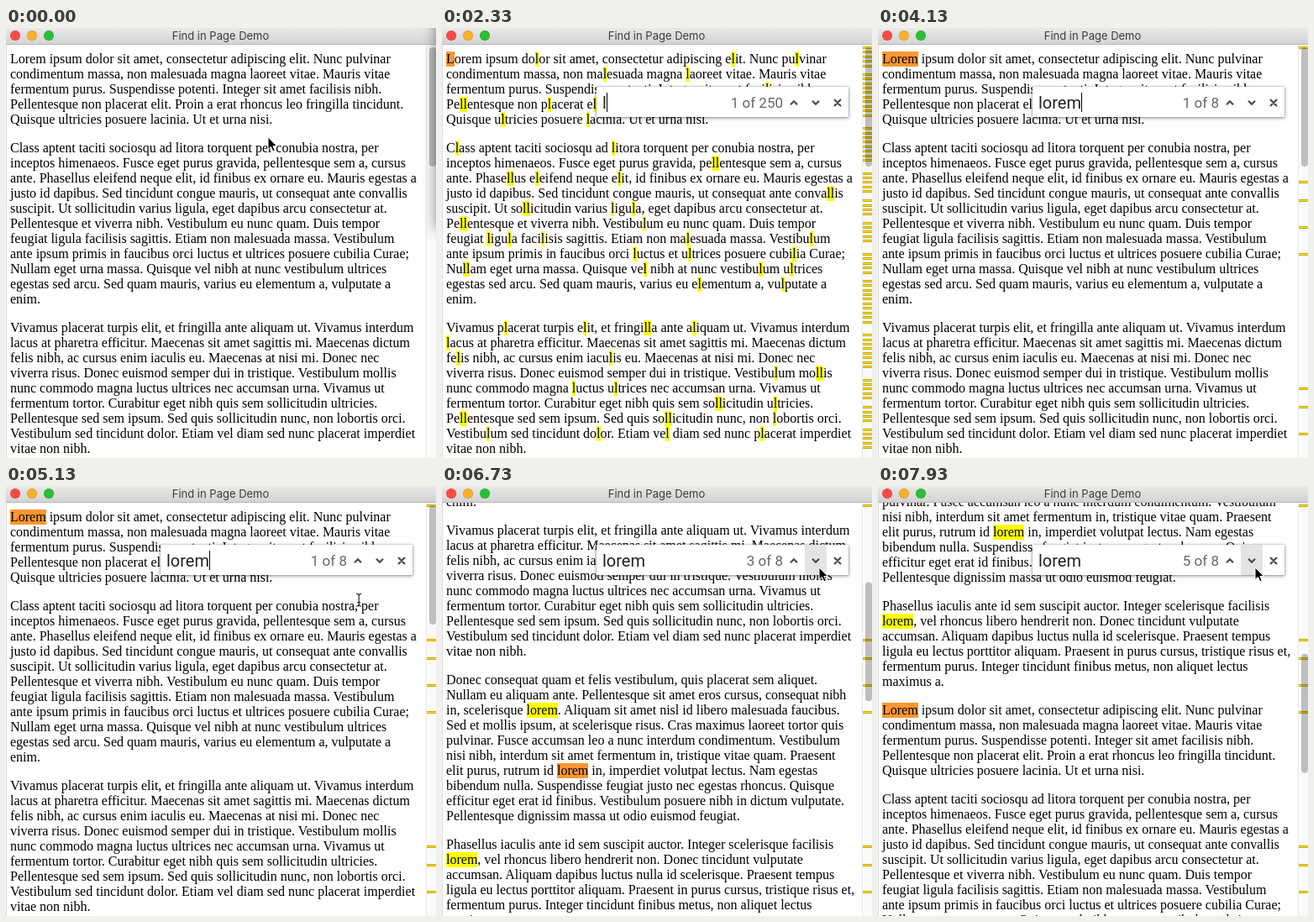
An HTML page for the animation above (8 s loop, 512 by 512 pixels).

```html
<!DOCTYPE html>
<html lang="en">
<head>
<meta charset="utf-8">
<title>Find in Page Demo</title>
<style>
  html, body { margin: 0; width: 100%; height: 100%; overflow: hidden; background: #fff; }
  #stage { position: relative; width: 512px; height: 512px; overflow: hidden; background: #fefefe; }
  #stage div, #stage svg { position: absolute; }
  #title { inset: 0 0 auto; height: 19px; border-bottom: 1px solid #b9b9b9;
    background: linear-gradient(#e9e9e9, #d3d3d3); color: #3c3c3c; text-align: center;
    font: 13px/19px Inter, sans-serif; text-indent: -1px; }
  #title i { position: absolute; top: 3px; width: 12px; height: 12px; border-radius: 50%; box-shadow: inset 0 0 0 .5px #0003; }
  #view { top: 20px; left: 0; width: 500px; height: 492px; overflow: hidden; }
  #doc { top: 0; left: 0; width: 500px; }
  #text { top: 8px; left: 5px; font: 16px/18px "Liberation Serif", Times, serif; color: #000; white-space: pre; }
  #text p { margin: 0 0 16px; }
  #text span { display: block; }
  .hit { height: 18px; background: #ff0; }
  .hit.on { background: #ff9632; }
  #track { top: 20px; left: 500px; width: 11px; height: 492px; background: #fafafa; border-left: 1px solid #e8e8e8; }
  .tick { left: 0; width: 11px; height: 1px; background: #ffe11a; border: solid #c9a800; border-width: 1px 0; }
  #thumb { top: 3px; left: 3px; width: 8px; height: 142px; border-radius: 4px; background: #0000003d; }
  #edge { left: 0; top: 20px; width: 1px; height: 492px; background: #dedede; }
  #shade { left: 514px; top: -20px; width: 40px; height: 254px; box-shadow: 0 4px 16px 2px #0007; }
  #bar { left: 184px; top: 70px; width: 300px; height: 36px; background: #fff;
    box-shadow: 0 0 1px #0006, 0 1px 4px #0007; font-family: Roboto, sans-serif; }
  #query { left: 7px; top: 7px; font-size: 20px; line-height: 24px; color: #222; white-space: pre; }
  #caret { right: -1px; top: 0; width: 1px; height: 23px; background: #000; }
  #count { right: 78px; top: 7px; font-size: 17px; line-height: 24px; color: #666; white-space: pre; }
  #hover { left: 248px; top: 0; width: 26px; height: 36px; background: #e4e4e4; }
  #bar svg { left: 0; top: 0; fill: none; stroke: #4a4a4a; stroke-width: 2.2; }
  .mouse { left: 0; top: 0; overflow: visible; }
</style>
</head>
<body>
<div id="stage">
  <div id="view"><div id="doc"><div id="marks"></div><div id="text"></div></div></div>
  <div id="track"><div id="ticks"></div><div id="thumb"></div></div>
  <div id="edge"></div>
  <div id="title"><i style="left:5px;background:#fc4a46"></i><i style="left:25px;background:#fdb02b"></i><i style="left:45px;background:#29c032"></i>Find in Page Demo</div>
  <div id="bar">
    <div id="hover"></div>
    <div id="query"><span id="typed"></span><div id="caret"></div></div>
    <div id="count"></div>
    <svg width="300" height="36"><path d="M231 21.2l4-4 4 4M257 16.8l4 4 4-4M283 15l8 8m0-8l-8 8"/></svg>
  </div>
  <div id="shade"></div>
  <svg id="arrow" class="mouse" width="12" height="18"><path d="M0 0V14.5L3.4 11.4 5.8 16.8 8.2 15.8 5.9 10.5H10.4Z" fill="#000" stroke="#fff" stroke-width="1" stroke-linejoin="round"/></svg>
  <svg id="beam" class="mouse" width="8" height="17"><g fill="none"><path d="M-3-7.5Q0-7.5 0-5V5Q0 7.5-3 7.5M3-7.5Q0-7.5 0-5M0 5Q0 7.5 3 7.5M-2 3H2" stroke="#fff" stroke-width="2.4"/><path d="M-3-7.5Q0-7.5 0-5V5Q0 7.5-3 7.5M3-7.5Q0-7.5 0-5M0 5Q0 7.5 3 7.5M-2 3H2" stroke="#111" stroke-width="1.1"/></g></svg>
</div>
<script>
const COPY = `Lorem ipsum dolor sit amet, consectetur adipiscing elit. Nunc pulvinar
condimentum massa, non malesuada magna laoreet vitae. Mauris vitae
fermentum purus. Suspendisse potenti. Integer sit amet facilisis nibh.
Pellentesque non placerat elit. Proin a erat rhoncus leo fringilla tincidunt.
Quisque ultricies posuere lacinia. Ut et urna nisi.

Class aptent taciti sociosqu ad litora torquent per conubia nostra, per
inceptos himenaeos. Fusce eget purus gravida, pellentesque sem a, cursus
ante. Phasellus eleifend neque elit, id finibus ex ornare eu. Mauris egestas a
justo id dapibus. Sed tincidunt congue mauris, ut consequat ante convallis
suscipit. Ut sollicitudin varius ligula, eget dapibus arcu consectetur at.
Pellentesque et viverra nibh. Vestibulum eu nunc quam. Duis tempor
feugiat ligula facilisis sagittis. Etiam non malesuada massa. Vestibulum
ante ipsum primis in faucibus orci luctus et ultrices posuere cubilia Curae;
Nullam eget urna massa. Quisque vel nibh at nunc vestibulum ultrices
egestas sed arcu. Sed quam mauris, varius eu elementum a, vulputate a
enim.

Vivamus placerat turpis elit, et fringilla ante aliquam ut. Vivamus interdum
lacus at pharetra efficitur. Maecenas sit amet sagittis mi. Maecenas dictum
felis nibh, ac cursus enim iaculis eu. Maecenas at nisi mi. Donec nec
viverra risus. Donec euismod semper dui in tristique. Vestibulum mollis
nunc commodo magna luctus ultrices nec accumsan urna. Vivamus ut
fermentum tortor. Curabitur eget nibh quis sem sollicitudin ultricies.
Pellentesque sed sem ipsum. Sed quis sollicitudin nunc, non lobortis orci.
Vestibulum sed tincidunt dolor. Etiam vel diam sed nunc placerat imperdiet
vitae non nibh.

Donec consequat quam et felis vestibulum, quis placerat sem aliquet.
Nullam eu aliquam ante. Pellentesque sit amet eros cursus, consequat nibh
in, scelerisque lorem. Aliquam sit amet nisl id libero malesuada faucibus.
Sed et mollis ipsum, at scelerisque risus. Cras maximus laoreet tortor quis
pulvinar. Fusce accumsan leo a nunc interdum condimentum. Vestibulum
nisi nibh, interdum sit amet fermentum in, tristique vitae quam. Praesent
elit purus, rutrum id lorem in, imperdiet volutpat lectus. Nam egestas
bibendum nulla. Suspendisse feugiat justo nec egestas rhoncus. Quisque
efficitur eget erat id finibus. Vestibulum posuere nibh in dictum vulputate.
Pellentesque dignissim massa ut odio euismod feugiat.

Phasellus iaculis ante id sem suscipit auctor. Integer scelerisque facilisis
lorem, vel rhoncus libero hendrerit non. Donec tincidunt vulputate
accumsan. Aliquam dapibus luctus nulla id scelerisque. Praesent tempus
ligula eu lectus porttitor aliquam. Praesent in purus cursus, tristique risus et,
fermentum purus. Integer tincidunt finibus metus, non aliquet lectus
maximus a.`;

const LOOP = 8000, VIEW_H = 492, DOC_H = 1636, RATIO = VIEW_H / DOC_H;

// time, query, current match, scroll offset
const STEPS = [
  [0, null, 0, 0], [970, '', 0, 0], [2000, 'l', 1, 0], [2470, 'lo', 1, 0],
  [2870, 'lor', 1, 0], [3270, 'lore', 1, 0], [4000, 'lorem', 1, 0],
  [5730, 'lorem', 2, 304], [6470, 'lorem', 3, 304],
  [7170, 'lorem', 4, 304], [7870, 'lorem', 5, 588]
];
// time, x, y
const PATH = [
  [0, 312, 130], [200, 313, 132], [870, 330, 152], [4730, 330, 152],
  [5130, 420, 136], [5470, 449, 97], [LOOP, 449, 97]
];

const $ = id => document.getElementById(id);
const show = (el, on) => { el.style.visibility = on ? 'inherit' : 'hidden'; };
const add = (parent, tag, cls = '') => {
  const el = document.createElement(tag);
  el.className = cls;
  return parent.appendChild(el);
};

const lines = [];
for (const para of (COPY + '\n\n' + COPY).split('\n\n')) {
  const p = add($('text'), 'p');
  for (const line of para.split('\n')) {
    const span = add(p, 'span');
    span.textContent = line;
    lines.push(span);
  }
}

function search(query) {
  const marks = add($('marks'), 'div'), ticks = add($('ticks'), 'div'), hits = [];
  const origin = $('doc').getBoundingClientRect(), range = document.createRange();
  for (const line of lines) {
    const text = line.textContent.toLowerCase();
    const top = line.getBoundingClientRect().top - origin.top;
    for (let i = text.indexOf(query); i >= 0; i = text.indexOf(query, i + query.length)) {
      range.setStart(line.firstChild, i);
      range.setEnd(line.firstChild, i + query.length);
      const box = range.getBoundingClientRect();
      const hit = add(marks, 'div', 'hit');
      hit.style.cssText = `left:${box.left - origin.left}px;top:${top}px;width:${box.width}px`;
      add(ticks, 'div', 'tick').style.top = Math.round(top * RATIO - 0.5) + 'px';
      hits.push(hit);
    }
  }
  return { marks, ticks, hits };
}

const found = {};
for (const [, q] of STEPS) if (q && !found[q]) found[q] = search(q);

let shown = -1;
function apply(n) {
  if (n === shown) return;
  shown = n;
  const [, query, current, scroll] = STEPS[n];
  for (const q in found) {
    const { marks, ticks, hits } = found[q];
    show(marks, q === query);
    show(ticks, q === query);
    hits.forEach((h, i) => h.classList.toggle('on', i === current - 1));
  }
  show($('bar'), query !== null);
  $('typed').textContent = query || '';
  $('count').textContent = query ? `${current} of ${found[query].hits.length}` : '';
  $('doc').style.transform = `translateY(${-scroll}px)`;
  $('thumb').style.transform = `translateY(${scroll * RATIO}px)`;
}

function mouseAt(t) {
  const i = PATH.findIndex(p => p[0] > t), [t0, x0, y0] = PATH[i - 1], [t1, x1, y1] = PATH[i];
  const k = (t - t0) / (t1 - t0), e = k * (2 - k);
  return [x0 + (x1 - x0) * e, y0 + (y1 - y0) * e];
}

function draw(t) {
  const n = STEPS.findLastIndex(s => s[0] <= t);
  apply(n);
  show($('caret'), n > 0 && t < 5670 && (t - STEPS[n][0]) % 1000 < 480);
  show($('hover'), t >= 5400);

  const [x, y] = mouseAt(t);
  const visible = t < 970 || t >= 4730;
  const beam = (t >= 200 && t < 5330) || (t >= 7700 && t < 7870);
  for (const id of ['arrow', 'beam']) {
    $(id).style.transform = `translate(${x}px,${y}px)`;
    show($(id), visible && beam === (id === 'beam'));
  }

  $('shade').style.opacity = Math.max(0, 1 - t / 400);
}

function frame() {
  draw(performance.now() % LOOP);
  requestAnimationFrame(frame);
}
frame();
</script>
</body>
</html>
```
